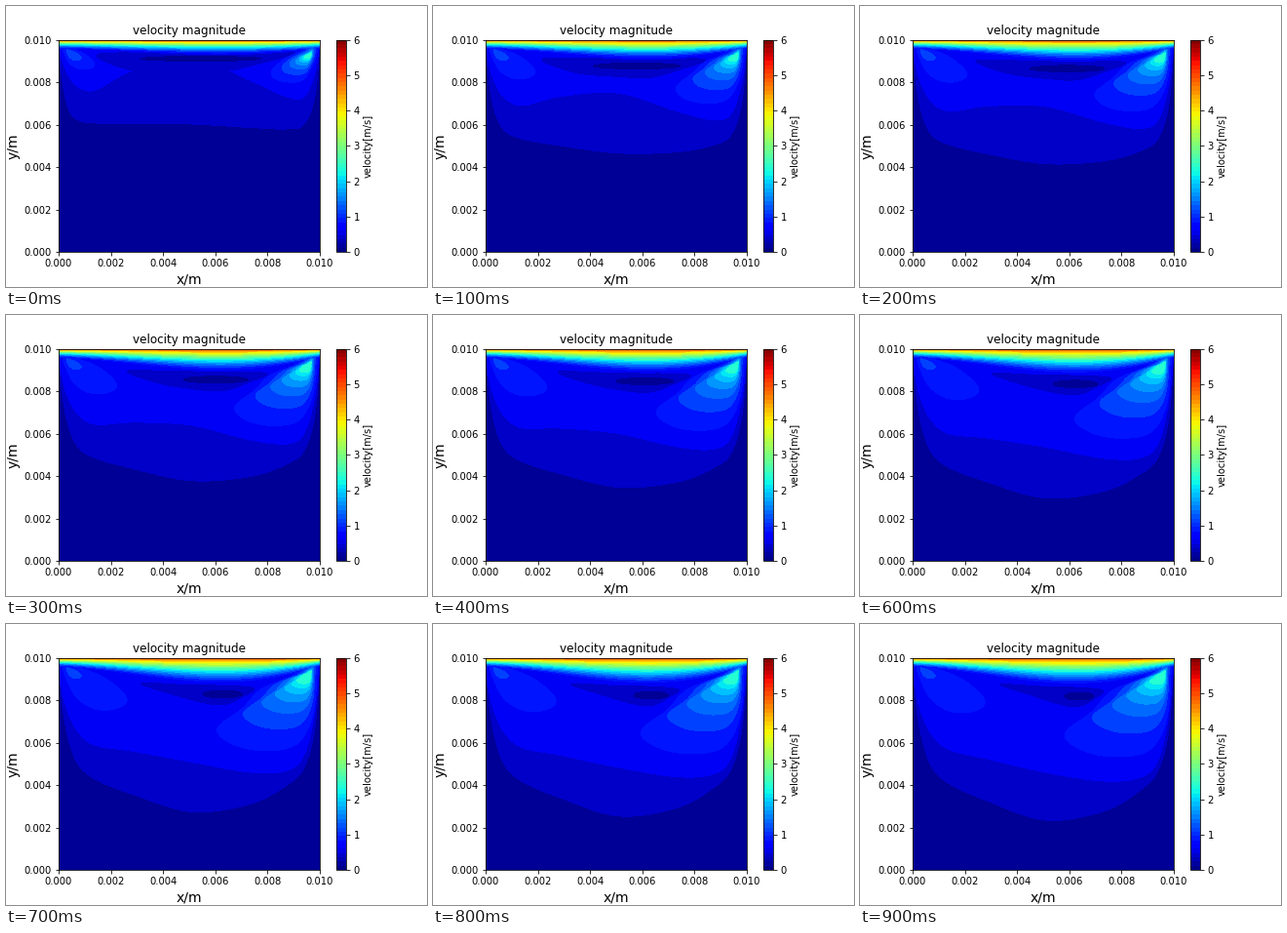
A matplotlib script for the animation above (1000 ms loop, 432 px wide and 288 px high).

```python
import numpy as np
import matplotlib.pyplot as plt
from matplotlib.animation import FuncAnimation
from matplotlib.cm import ScalarMappable
from matplotlib.colors import BoundaryNorm, ListedColormap

STEPS = 10
STEP_MS = 100
LEFT, RIGHT, TOP, BOTTOM = 54, 321.84, 34.56, 252  # axes box in stage pixels
SIDE = 0.01
MAX_SPEED, LID_SPEED, BAND = 6, 5, 0.25
BAR_BANDS = 50


def jet_bands(count):
    return plt.get_cmap("jet")((np.arange(count) + 0.5) / count)


COLORS = jet_bands(int(MAX_SPEED / BAND))

# Key points in stage pixels, as (first pose, last pose).
FRONT_X = [54, 58, 64, 74, 92, 130, 190, 250, 288, 306, 317, 322]
SLOW_FRONT = ([38, 78, 105, 117, 120, 120.5, 121, 124.5, 126, 121, 92, 38],
              [38, 85, 119, 147, 164, 181, 201, 192, 170, 150, 108, 38])
FAST_FRONT = ([38, 56, 71, 83, 86, 66, 52, 76, 93, 93, 68, 38],
              [38, 72, 94, 114, 129, 138, 152, 161, 157, 139, 92, 38])
POCKET = ([(93, 50), (150, 48), (220, 48), (296, 47), (256, 60), (219, 67), (180, 66), (130, 66)],
          [(144, 62), (185, 64), (220, 65), (249, 68), (241, 76), (226, 84), (208, 83), (173, 72)])
PLUME = ([(317, 38), (303, 46), (290, 52), (281, 58), (273, 66),
          (275, 74), (290, 78), (304, 76), (313, 64), (319, 48)],
         [(316, 39), (292, 54), (258, 69), (238, 90), (210, 113),
          (230, 130), (264, 136), (297, 129), (314, 100), (319, 52)])
PLUME_CENTRE = np.array([312, 50])
PLUME_SHRINK = 0.72  # each faster band of the plume is this much smaller
PLUME_TOP_SPEED = 2.25

# Eddy outline relative to its upper left end.
EDDY = np.array([(1, 0), (5, 16), (14, 32), (29, 42), (45, 44),
                 (59, 40), (63, 33), (55, 23), (40, 12), (20, 4)])


def blend(pose, q):
    first, last = np.asarray(pose, float)
    return first + (last - first) * q


def smooth(points, closed=True, n=8):
    """Catmull-Rom curve through the points."""
    p = np.asarray(points, float)
    if closed:
        p = np.vstack([p[-1], p, p[:2]])
    else:
        p = np.vstack([p[0], p, p[-1]])
    u = np.linspace(0, 1, n, endpoint=False)[:, None]
    parts = [
        b + u / 2 * (c - a + u * (2 * a - 5 * b + 4 * c - d + u * (3 * (b - c) + d - a)))
        for a, b, c, d in zip(p, p[1:], p[2:], p[3:])
    ]
    return np.vstack(parts + [p[-2:-1]])


def paint(points, speed):
    x, y = np.asarray(points).T
    ax.fill((x - LEFT) / (RIGHT - LEFT) * SIDE, (BOTTOM - y) / (BOTTOM - TOP) * SIDE,
            color=COLORS[round(speed / BAND)], lw=0, antialiased=False)


def paint_above(curve, speed):
    paint(np.vstack([curve, [(RIGHT + 1, TOP - 1), (LEFT - 1, TOP - 1)]]), speed)


def paint_front(pose, q, speed):
    points = np.column_stack([FRONT_X, blend(pose, q)])
    paint_above(smooth(points, closed=False), speed)


def paint_pocket(q):
    paint(smooth(blend(POCKET, q)), BAND)
    angle = np.linspace(0, 2 * np.pi, 40)
    x = blend((200, 225), q) + blend((62, 15), q) * np.cos(angle)
    y = blend((54, 74), q) + blend((2.5, 4), q) * np.sin(angle)
    paint(np.column_stack([x, y]), 0)


def paint_jet(q, speed):
    s = np.linspace(0, 1, 80)
    swell = np.sin(np.pi * s ** 1.45)
    thickness = 14 + (blend((22, 42), q) - 14) * swell
    y = TOP + thickness * (1 - np.sqrt(speed / LID_SPEED))
    paint_above(np.column_stack([LEFT + s * (RIGHT - LEFT), y]), speed)


def paint_plume(q, speed):
    scale = PLUME_SHRINK ** ((speed - 0.75) / BAND)
    paint(PLUME_CENTRE + (smooth(blend(PLUME, q)) - PLUME_CENTRE) * scale, speed)


def draw(step):
    for patch in list(ax.patches):
        patch.remove()
    q = (step / (STEPS - 1)) ** 0.45  # momentum spreads about as the root of time
    paint_front(SLOW_FRONT, q, 0.25)
    paint_front(FAST_FRONT, q, 0.5)
    paint_pocket(q)
    for speed in np.arange(0.5, LID_SPEED, BAND):
        if speed == 0.75:
            paint(smooth((58, 42) + EDDY * blend((0.52, 1.11), q)), speed)
        if speed == 1:
            paint(smooth((62, 45) + EDDY * 0.24), speed)
        if 0.75 <= speed <= PLUME_TOP_SPEED:
            paint_plume(q, speed)
        paint_jet(q, speed)
    return ax.patches


plt.rcParams.update({"font.family": "DejaVu Sans", "text.kerning_factor": 6})
fig, ax = plt.subplots(figsize=(6, 4), dpi=72)
fig.subplots_adjust(left=0.125, right=0.9, bottom=0.125, top=0.88)
ax.set_facecolor(COLORS[0])
ax.set(xlim=(0, SIDE), ylim=(0, SIDE))
ax.set_title("velocity magnitude", fontsize=12)
ax.set_xlabel("x/m", fontsize=14)
ax.set_ylabel("y/m", fontsize=14)
bar_norm = BoundaryNorm(np.linspace(0, MAX_SPEED, BAR_BANDS + 1), BAR_BANDS)
bar = fig.colorbar(ScalarMappable(bar_norm, ListedColormap(jet_bands(BAR_BANDS))), ax=ax,
                   ticks=range(MAX_SPEED + 1), spacing="proportional", label="velocity[m/s]")
bar.minorticks_off()

anim = FuncAnimation(fig, draw, frames=STEPS, init_func=lambda: draw(0), interval=STEP_MS,
                     repeat=True, repeat_delay=0, blit=False)
plt.show()
```
